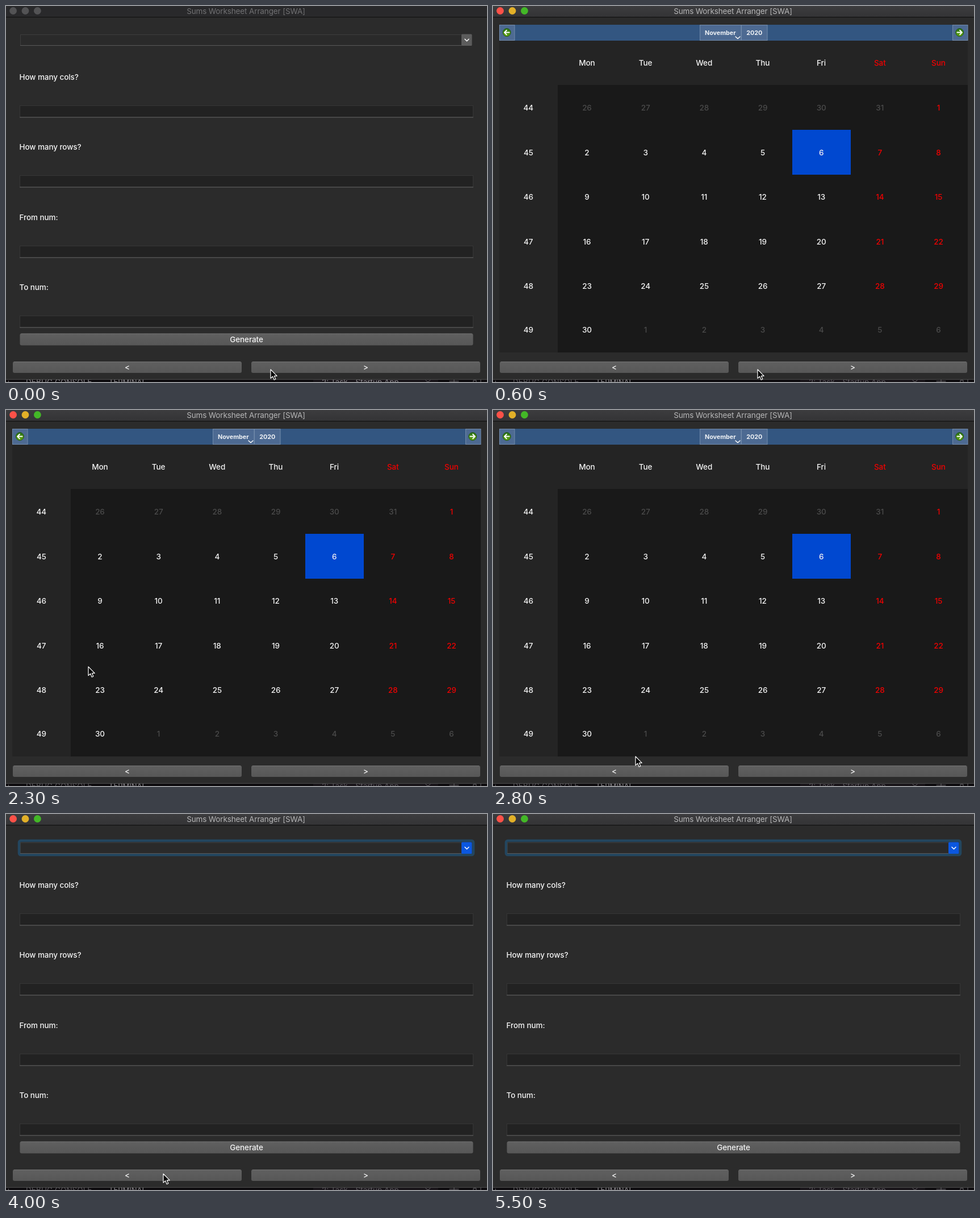
Write an HTML page that moves like this. It is 847 px wide and 662 px high and loops after 6200 ms.

```html
<!DOCTYPE html>
<html lang="en">
<head>
<meta charset="utf-8">
<title>Sums Worksheet Arranger</title>
<style>
  html, body { margin: 0; width: 100%; height: 100%; overflow: hidden; background: #2b2b2b; }
  svg { display: block; width: 847px; height: 662px; }
  text { font: 450 13.5px Inter, "Open Sans", sans-serif; letter-spacing: -.08px; fill: #f4f4f4; white-space: pre; }
  .mid { text-anchor: middle; }
  .title { font-weight: 400; letter-spacing: -.13px; fill: #b6b6b7; }
  .num { font-weight: 500; }
  .nav { font-size: 10.8px; font-weight: 700; letter-spacing: -.04px; fill: #eef1f5; }
  .behind text { font-weight: 400; letter-spacing: 0; fill: #5c595e; }
  .idle .behind text { fill: #8a878c; }
  .idle .title { fill: #717173; }
  .idle .light { fill: #535355; }
  .idle .bar { fill: #29292b; }
  .idle .ring { display: none; }
  .idle .arrow { fill: #5c5c5c; }
</style>
</head>
<body>
<svg id="stage" viewBox="0 0 847 662">
  <defs>
    <linearGradient id="barFill" x2="0" y2="1"><stop stop-color="#3c3c3e"/><stop offset="1" stop-color="#343436"/></linearGradient>
    <linearGradient id="grey" x2="0" y2="1"><stop stop-color="#606060"/><stop offset="1" stop-color="#575757"/></linearGradient>
    <linearGradient id="blue" x2="0" y2="1"><stop stop-color="#1c6cf6"/><stop offset="1" stop-color="#0c5be6"/></linearGradient>
    <linearGradient id="green" x2="0" y2="1"><stop stop-color="#277018"/><stop offset="1" stop-color="#62a80c"/></linearGradient>
  </defs>
</svg>
<script>
const LOOP = 6200, STEP = 100;
const stage = document.getElementById('stage');

function el(parent, tag, attrs = {}, text) {
  const node = document.createElementNS('http://www.w3.org/2000/svg', tag);
  for (const key in attrs) node.setAttribute(key, attrs[key]);
  if (text !== undefined) node.textContent = text;
  return parent.appendChild(node);
}
const group = (cls = '') => el(stage, 'g', { class: cls });
const rect = (g, x, y, width, height, fill, more) => el(g, 'rect', { x, y, width, height, fill, ...more });
const line = (g, d, stroke, w = 1) =>
  el(g, 'path', { d, stroke, fill: 'none', 'stroke-width': w, 'stroke-linecap': 'round', 'stroke-linejoin': 'round' });
const label = (g, x, y, text, cls = '', style = '') => el(g, 'text', { x, y, class: cls, style }, text);

function button(g, x, y, w, h, text, fill = 'url(#grey)') {
  const face = rect(g, x, y, w, h, fill, { rx: 3 });
  rect(g, x + 2, y, w - 4, 1, '#fff', { opacity: .13 });
  label(g, x + w / 2, y + h / 2 + 5, text, 'mid');
  return face;
}

function drawWindow() {
  const back = group('behind');
  rect(back, 0, 656, 847, 6, '#0d0b0e');
  rect(back, 541, 658, 220, 4, '#181419');
  label(back, 35, 667, 'DEBUG CONSOLE', '', 'font-size:13.6px');
  label(back, 181, 667, 'TERMINAL', '', 'font-size:13px;fill:#8f8c91');
  label(back, 556, 667, '2: Task - Startup App');
  line(back, 'M739 659l4 3l4 -3M781 660.5h16M789 658v4M823 662v-3h5v3M836 658v4M4.5 660v2', '#6b686d');

  const win = group();
  rect(win, 0, 0, 847, 657, '#2b2b2b');
  rect(win, 0, 657, 847, 1, '#4c4c4c');
  rect(win, 0, 0, 847, 19, 'url(#barFill)', { class: 'bar' });
  rect(win, 0, 19, 847, 1.2, '#121212');
  ['#fc5148', '#e2b028', '#43b727'].forEach((fill, i) =>
    el(win, 'circle', { cx: 12.6 + 21.4 * i, cy: 8.5, r: 6.4, fill, class: 'light' }));
  label(win, 422.5, 14, 'Sums Worksheet Arranger [SWA]', 'title mid');
  button(win, 12, 626, 403, 20, '<').nextSibling.nextSibling.classList.add('num');
  const next = button(win, 432, 626, 403, 20, '>');
  next.nextSibling.nextSibling.classList.add('num');
  return next;
}

function drawForm() {
  const g = group();
  rect(g, 23, 47, 800, 25, 'none', { class: 'ring', stroke: '#23465f', 'stroke-width': 4.5, rx: 3 });
  rect(g, 25.5, 50.5, 777, 19, '#2a2a2a', { stroke: '#3d3d3d' });
  rect(g, 25, 69, 777, 1, '#595959');
  rect(g, 802, 49.5, 18.5, 20.5, '#0b57df', { class: 'arrow', rx: 1.5 });
  line(g, 'M808 58.3l3.5 3.4l3.5 -3.4', '#fff', 1.5);
  ['How many cols?', 'How many rows?', 'From num:', 'To num:'].forEach((text, i) => {
    const y = Math.round(123.4 * i);
    label(g, 23.5, y + 130, text);
    rect(g, 24.5, y + 175.5, 798, 20, '#222', { stroke: '#363636' });
    rect(g, 24, y + 195.5, 799, 1, '#606060');
  });
  button(g, 24.5, 576.5, 798, 21, 'Generate');
  return g;
}

function drawCalendar() {
  const g = group(), colX = i => 62.3 + 103.17 * i;
  const rowY = [100, 179, 257.7, 336.5, 415, 492.7, 570.5];
  const cell = (col, row, text, fill, cls = 'num') =>
    label(g, colX(col), rowY[row] + 4.9, text, cls + ' mid', `fill:${fill}`);

  rect(g, 11, 61, 825, 549, '#242424');
  rect(g, 114, 139, 722, 471, '#191919');
  rect(g, 527, 218, 103, 79, '#0048d0');
  rect(g, 11, 33, 825, 28, '#335681');
  [[11, 27], [364, 73], [437, 46], [809, 27]].forEach(([x, w]) =>
    rect(g, x + .5, 33.5, w - 1 + .5, 27, '#4d6a92', { stroke: '#728bab' }));
  label(g, 400.3, 51, 'November', 'nav mid');
  label(g, 460.2, 51, '2020', 'nav mid');
  line(g, 'M427 54l4 3.6l4 -3.6', '#fff', 1.4);
  [[24.3, 1], [821.7, -1]].forEach(([x, dir]) => {
    const icon = el(g, 'g', { transform: `translate(${x} 46.6) scale(${dir} 1)` });
    el(icon, 'circle', { r: 7, fill: 'url(#green)', stroke: '#23551a' });
    line(icon, 'M4.3 0h-8M-.4 -3.8l-3.8 3.8l3.8 3.8', '#fff', 2);
  });

  const first = new Date(2020, 9, 26);
  ['Mon', 'Tue', 'Wed', 'Thu', 'Fri', 'Sat', 'Sun'].forEach((day, i) =>
    cell(i + 1, 0, day, i > 4 ? '#f00000' : '#f4f4f4', ''));
  for (let week = 0; week < 6; week++) {
    cell(0, week + 1, 44 + week, '#f4f4f4');
    for (let day = 0; day < 7; day++) {
      const date = new Date(2020, 9, first.getDate() + week * 7 + day);
      const inside = date.getMonth() === 10;
      cell(day + 1, week + 1, date.getDate(),
        !inside ? '#4b4b4b' : day > 4 ? '#f00000' : '#f4f4f4', inside ? 'num' : '');
    }
  }
  return g;
}

// Pointer runs: start time, then one position per step.
const runs = [
  [0, [466, 640]],
  [1600, [455, 602], [418, 490], [350, 350], [277, 264], [215, 244], [167, 289], [142, 378]],
  [2300, [145, 452], [157, 510], [178, 552], [203, 582], [229, 600], [251, 610], [267.5, 616]],
  [3000, [269, 619], [271, 623], [273, 627], [275.5, 631], [277, 633.5]],
  [4800, [298, 590], [345, 470], [400, 300], [447, 130], [469, 26]]
];
function pointerAt(t) {
  const [start, ...path] = runs.filter(run => run[0] <= t).pop();
  return path[Math.min(path.length - 1, Math.floor((t - start) / STEP))];
}

const next = drawWindow(), form = drawForm(), calendar = drawCalendar();
const pointer = el(stage, 'path', {
  d: 'M0 0V15.6L3.6 12.2L6.2 18.2L8.8 17L6.3 11.3H11.2Z',
  fill: '#000', stroke: '#fff', 'stroke-width': 1.2, 'stroke-linejoin': 'round'
});
const show = (node, on) => node.setAttribute('display', on ? 'inline' : 'none');

function render(t) {
  const onCalendar = t >= 600 && t < 4000;
  stage.setAttribute('class', t < 500 ? 'idle' : '');
  next.setAttribute('fill', t >= 500 && t < 600 ? 'url(#blue)' : 'url(#grey)');
  show(form, !onCalendar);
  show(calendar, onCalendar);
  show(pointer, t < 5500);
  pointer.setAttribute('transform', `translate(${pointerAt(t)})`);
}

const began = performance.now();
function tick() {
  render((performance.now() - began) % LOOP);
  requestAnimationFrame(tick);
}
tick();
</script>
</body>
</html>
```
